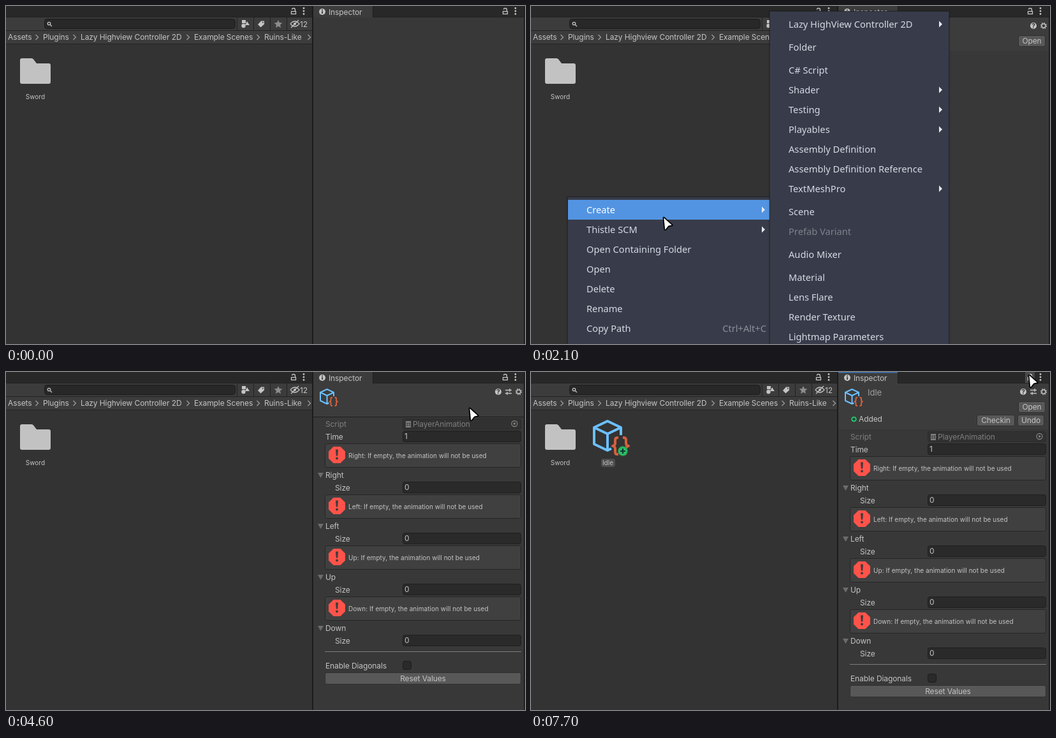
These frames come from a looping animation (814x530 px, 8 s). An HTML page:

```html
<!DOCTYPE html>
<html lang="en">
<head>
<meta charset="utf-8">
<title>Creating an animation asset</title>
<style>
html, body { margin: 0; width: 100%; height: 100%; overflow: hidden; background: #333; }
svg { display: block; width: 814px; height: 530px; }
svg [style] { animation: 8s step-end infinite; }
text { white-space: pre; }
.u { font: 12px Inter, "Liberation Sans", sans-serif; letter-spacing: -.1px; fill: #c4c4c4; }
.s { font: 10px Inter, "Liberation Sans", sans-serif; letter-spacing: .04px; fill: #c4c4c4; }
.t { font: 13px Inter, "Liberation Sans", sans-serif; fill: #a0a0a0; }
.m { font: 14.667px "Noto Sans", "Open Sans", sans-serif; fill: #d3dae3; }
.c { text-anchor: middle; }
.e { text-anchor: end; }
.line { fill: none; stroke: #c4c4c4; stroke-width: 1.3; }
</style>
</head>
<body>
<svg id="stage" viewBox="0 0 814 530"></svg>
<script>
const LOOP = 8000, STEP = 100;
const css = [];

// Stepped keyframes from [ms, value] pairs
const track = (prop, pairs) => {
  const name = 'k' + css.length;
  css.push(`@keyframes ${name}{${pairs.map(([t, v]) => `${t * 100 / LOOP}%{${prop}:${v}}`).join('')}}`);
  return `style="animation-name:${name}"`;
};
const show = (from, to, body) =>
  `<g ${track('visibility', [[0, 'hidden'], [from, 'visible'], [to, 'hidden']])}>${body}</g>`;
const move = (pairs, body) =>
  `<g ${track('transform', pairs.map(([t, x, y]) => [t, `translate(${x}px,${y}px)`]))}>${body}</g>`;

const rect = (x, y, w, h, fill, more = '') =>
  `<rect x="${x}" y="${y}" width="${w}" height="${h}" fill="${fill}" ${more}/>`;
const box = (x, y, w, h, fill, stroke, r = 3) =>
  rect(x + .5, y + .5, w - 1, h - 1, fill, `stroke="${stroke}" rx="${r}"`);
const disc = (x, y, r, fill) => `<circle cx="${x}" cy="${y}" r="${r}" fill="${fill}"/>`;
const path = (d, fill, more = '') => `<path d="${d}" fill="${fill}" ${more}/>`;
const line = (d, more = '') => `<path class="line" d="${d}" ${more}/>`;
const text = (x, y, s, cls = 'u', more = '') => `<text x="${x}" y="${y}" class="${cls}" ${more}>${s}</text>`;
const at = (x, y, body, k = 1) => `<g transform="translate(${x} ${y}) scale(${k})">${body}</g>`;
const button = (x, y, w, h, s) =>
  box(x, y, w, h, '#585858', '#303030') + text(x + w / 2, y + h / 2 + 4.3, s, 'u c', 'fill="#eee"');

// Icons
const lock = x => rect(x - 3.5, 8.5, 7, 4, 'none', 'stroke="#c4c4c4" stroke-width="1.3"') +
  line(`M${x + 2.5} 8V6q0-2.5-2.5-2.5T${x - 2.5} 5.5`);
const dots = x => [3.5, 8, 12.5].map(y => disc(x, y, 1.4, '#c4c4c4')).join('');
const folder = path('M22 85q0-3 3-3h15q2 0 3 1.500l5 6.500h19q3 0 3 3v26q0 3-3 3H25q-3 0-3-3z', '#c2c2c2');
const help = x => disc(x, 31, 5, '#c4c4c4') + text(x, 34.5, '?', 's c', 'font-weight="700" fill="#333"')
  .replace('class', 'style="fill:#333;font-weight:700" class');
const gear = '<circle cx="804" cy="31" r="3" class="line" stroke-width="2"/>' +
  '<circle cx="804" cy="31" r="4.400" class="line" stroke-dasharray="1.730"/>';
const sliders = line('M783 28.500h10M783 33.500h10M790 26v5M786 31v5');
const brace = 'M137 103h-1.500q-3.500 0-3.500 3.500v5q0 4-4 4.500q4 .5 4 4.500v5q0 3.500 3.500 3.500h1.500';
const asset =
  `<g fill="none" stroke-width="4" stroke-linejoin="round">
    <path stroke="#6cc0ff" d="M141 99V87L120 77L99 87V113L120 123L126 120M99 87L120 97L141 87M120 97V123"/>
    <path stroke="#d4603c" d="${brace}"/><path stroke="#d4603c" d="${brace}" transform="matrix(-1 0 0 1 281 0)"/>
  </g>`;
const alertIcon = path('M-5.400-13H5.400L13-5.400V5.400L5.400 13H-5.400L-13 5.400V-5.400Z', '#ff534a') +
  path('M-2-8.500h4l-.8 10h-2.400z', '#3c3c3c') + disc(0, 5.5, 1.9, '#3c3c3c');

// Project panel
const crumbs = [[3, 'Assets', 49], [58, 'Plugins', 108], [117, 'Lazy Highview Controller 2D', 286],
  [295, 'Example Scenes', 396], [405, 'Ruins-Like', 476]];
const project =
  rect(0, 0, 481, 530, '#333') + rect(0, 0, 481, 17, '#282828') + rect(0, 17, 481, 42, '#3c3c3c') +
  rect(0, 17, 481, 1, '#232323') + rect(0, 38, 481, 1, '#232323') + rect(0, 59, 481, 1, '#232323') +
  lock(451) + dots(467) +
  box(60, 20, 300, 16, '#282828', '#1b1b1b', 4) +
  '<circle cx="67.500" cy="27.500" r="2.200" class="line"/>' + line('M69 29l3 3') +
  [362, 388, 414, 440].map(x => rect(x, 18, 1, 20, '#232323')).join('') +
  rect(370, 22, 6, 5, '#c4c4c4') + disc(372.5, 31, 3.2, '#c4c4c4') + path('M378 24l4 6h-7z', '#c4c4c4') +
  path('M395 29l5-5.500h5v5l-5.500 5z', '#c4c4c4') + disc(402.8, 25.7, 1, '#3c3c3c') +
  path('M427 22l1.900 4.100 4.500.5-3.400 3 1 4.400-4-2.300-4 2.300 1-4.400-3.400-3 4.500-.5z', '#8c8c8c') +
  line('M446 28q7-8 14 0q-7 8-14 0M447 34L459 22') + disc(453, 28, 2, '#c4c4c4') + text(461, 33, '12') +
  crumbs.map(([x, s, a]) => text(x, 53, s) + line(`M${a - 2.5} 45l4 4-4 4`, 'stroke-width="1.500" opacity=".7"')).join('') +
  folder + text(46, 146, 'Sword', 's c');

const caret = x => rect(x, 137, 1, 11, '#ddd');
const typed = (from, to, s, half) => show(from, to, text(120, 146, s, 's c') + caret(120 + half));
const item =
  show(4700, LOOP, asset) +
  show(4700, 6100, box(84, 135, 73, 15, '#2a2a2a', '#181818', 0)) +
  show(4700, 5400, rect(96, 136, 49, 12, '#3d73a8') + text(120.5, 146, 'Animation', 's c')) +
  typed(5400, 5700, 'I', 2) + typed(5700, 5800, 'Idl', 6) + typed(5800, 6100, 'Idle', 8.5) +
  show(6100, LOOP,
    `<rect x="110" y="136" width="22" height="13" rx="3" ${track('fill', [[0, '#2c5d87'], [7600, '#4d4d4d']])}/>` +
    text(120.5, 146, 'Idle', 's c') +
    disc(144, 124, 7.8, '#1f9a50') + disc(144, 124, 6.6, '#2bbd68') + line('M140 124h8M144 120v8', 'style="stroke:#133;stroke-width:2.200"'));

// Inspector panel
const frame =
  rect(481, 0, 333, 530, '#383838') + rect(481, 0, 333, 17, '#282828') + rect(481, 17, 333, 1, '#232323') +
  rect(482, 0, 93, 18, '#3c3c3c') + rect(575, 0, 1, 17, '#1e1e1e') +
  disc(496, 9, 5, '#c4c4c4') + rect(495.2, 8, 1.7, 4, '#333') + disc(496, 6.2, 1, '#333') + text(506, 14, 'Inspector') +
  show(7700, LOOP, rect(482, 0, 93, 1.5, '#3a72b0')) +
  show(7400, LOOP, rect(775, 0, 15, 17, '#4a4a4a')) +
  lock(783) + dots(799);
const edges = rect(480, 0, 2, 530, '#1c1c1c') + rect(812, 0, 2, 530, '#1f1f1f');

const folderInfo = show(300, 4600,
  rect(482, 18, 330, 52, '#3c3c3c') + at(481, -11, folder, .5) + text(528, 37, 'Animations', 't') +
  help(788) + gear + button(764, 46, 43, 18, 'Open'));

const field = (y, s) => box(622, y, 186, 18, '#2a2a2a', '#1f1f1f') + text(625, y + 13, s, 'u', 'fill="#d2d2d2"');
const group = (name, i) => {
  const y = 80 * i;
  return box(500, 112 + y, 308, 38, '#404040', '#262626') + at(519, 130 + y, alertIcon) +
    text(537, 135 + y, `${name}: If empty, the animation will not be used`, 's') +
    path(`M489 ${158 + y}h9l-4.500 8z`, '#6c6c6c') + text(501, 166 + y, name) +
    text(516, 186 + y, 'Size') + field(172 + y, '0');
};
const fields =
  `<g opacity=".5">${text(501, 86, 'Script')}${box(622, 73, 186, 17, '#2a2a2a', '#1f1f1f')}` +
  rect(627, 77, 8, 10, '#c4c4c4') + line('M629 79v6M633 79v6M628 80.500h6M628 83.500h6', 'style="stroke:#333;stroke-width:.8"') +
  text(638, 86, 'PlayerAnimation') + '<circle cx="797.500" cy="81" r="4.500" class="line"/>' + disc(797.5, 81, 1.8, '#c4c4c4') + '</g>' +
  text(501, 106, 'Time') + field(92, '1') +
  ['Right', 'Left', 'Up', 'Down'].map(group).join('') +
  rect(500, 438, 308, 1, '#7c7c7c') + text(501, 465, 'Enable Diagonals') +
  box(622, 453, 14, 14, '#2a2a2a', '#1c1c1c') + button(500, 471, 308, 19, 'Reset Values');
const assetInfo =
  show(4600, 6100, rect(482, 18, 330, 52, '#3c3c3c') + rect(482, 70, 330, 1, '#1e1e1e')) +
  show(6100, LOOP, rect(482, 18, 330, 72, '#3c3c3c') + rect(482, 90, 330, 1, '#353535') +
    text(528, 37, 'Idle', 't') + button(764, 46, 43, 18, 'Open') +
    disc(506.5, 74, 4.3, '#2bbd68') + line('M504 74h5M506.500 71.500v5', 'style="stroke:#133;stroke-width:1.400"') +
    text(514, 78, 'Added') + button(699, 67, 60, 18, 'Checkin') + button(763, 67, 42, 18, 'Undo')) +
  show(4600, LOOP, at(443.5, -11.5, asset, .5) + help(772) + sliders + gear +
    move([[0, 0, 0], [6100, 0, 20]], fields));

// Menus: items are [centre y, label, flags]; picks are [ms, row]
const menu = (x, y, w, h, items, picks, from) => {
  const lit = i => picks.filter(([t, r], n) => !n || r === i || picks[n - 1][1] === i);
  const fill = (i, base, on) => track('fill', lit(i).map(([t, r]) => [t, r === i ? on : base]));
  const rows = items.map(([cy, s, flag], i) =>
    `<text class="m" x="${x + 29}" y="${cy + 5}" ${fill(i, flag === 'off' ? '#7c818c' : '#d3dae3', '#fff')}>${s}</text>` +
    (flag === 'sub' ? path(`M${x + w - 15} ${cy - 5.5}l5 5-5 5z`, '#e6eaf0') : '') +
    (flag === 'key' ? `<text class="m e" x="${x + w - 8}" y="${cy + 5}" ${fill(i, '#8b909b', '#b5d1f3')}>Ctrl+Alt+C</text>` : ''));
  return show(from, 4500,
    rect(x - .5, y - .5, w + 1, h + 1, '#383c4a', 'stroke="#000" stroke-opacity=".12" stroke-width="4"') +
    rect(x - .5, y - .5, w + 1, h + 1, '#383c4a', 'stroke="#252833"') +
    move(picks.map(([t, r]) => [t, 0, r < 0 ? -100 : items[r][0] - 16]), rect(x, 0, w, 31, '#5294e2')) +
    rows.join(''));
};
const menus =
  menu(58, 300, 319, 260, [[320, 'Create', 'sub'], [351, 'Thistle SCM', 'sub'], [382, 'Open Containing Folder'],
    [413, 'Open'], [444, 'Delete'], [475, 'Rename'], [506, 'Copy Path', 'key']],
    [[0, -1], [1400, 6], [1500, 5], [1600, 3], [1700, 2], [1800, 1], [1900, 0]], 500) +
  menu(375, 9, 280, 560, [[29, 'Lazy HighView Controller 2D', 'sub'], [65, 'Folder'], [101, 'C# Script'],
    [132, 'Shader', 'sub'], [163, 'Testing', 'sub'], [194, 'Playables', 'sub'], [225, 'Assembly Definition'],
    [256, 'Assembly Definition Reference'], [287, 'TextMeshPro', 'sub'], [323, 'Scene'], [354, 'Prefab Variant', 'off'],
    [390, 'Audio Mixer'], [426, 'Material'], [457, 'Lens Flare'], [488, 'Render Texture'], [519, 'Lightmap Parameters']],
    [[0, -1], [2700, 4], [2800, 3], [2900, 2], [3000, 1], [3200, 0]], 2100) +
  menu(653, 9, 136, 70, [[29, 'Player Data'], [60, 'Animation']], [[0, -1], [3800, 0], [4100, 1]], 3400);

// Pointer
const smooth = f => f * f * (3 - 2 * f);
const glide = (t0, t1, [x0, y0], [x1, y1], ease = smooth, lead = 1) => {
  const n = (t1 - t0) / STEP + lead;
  return Array.from({ length: (t1 - t0) / STEP + 1 }, (_, i) => {
    const f = ease((i + lead) / n);
    return [t0 + i * STEP, Math.round(x0 + (x1 - x0) * f), Math.round(y0 + (y1 - y0) * f)];
  });
};
const spots = [
  [0, -50, -50],
  ...glide(1400, 1900, [178, 483], [206, 330], f => 1 - (1 - f) ** 1.5, 0),
  ...glide(2400, 3000, [206, 330], [517, 70]),
  [3100, 519, 50], [3200, 519, 33],
  ...glide(3400, 3900, [519, 33], [690, 32]),
  ...glide(4000, 4200, [690, 32], [725, 55]),
  [4700, -50, -50],
  ...glide(7000, 7400, [725, 55], [779, 3])
];
const pointer =
  move(spots, path('M1.500 2.500Q1.500.5 3.200 1.800L15.500 12.800Q16.500 14.300 14.500 14.500L10 15.300L5.500 21Q3.800 22 3.300 20Z',
    '#fff', 'stroke="#000" stroke-width="1.800" stroke-linejoin="round"')) +
  show(4700, 7000, path('M727 50l4.200 5.500h-2.700v7h2.700L727 68l-4.200-5.500h2.700v-7h-2.700z',
    '#fff', 'stroke="#000" stroke-width="1.200" stroke-linejoin="round"'));

const scene = project + item + frame + folderInfo + assetInfo + edges + menus + pointer;
const sheet = document.createElement('style');
sheet.textContent = css.join('\n');
document.head.append(sheet);
document.getElementById('stage').innerHTML = scene;
</script>
</body>
</html>
```
